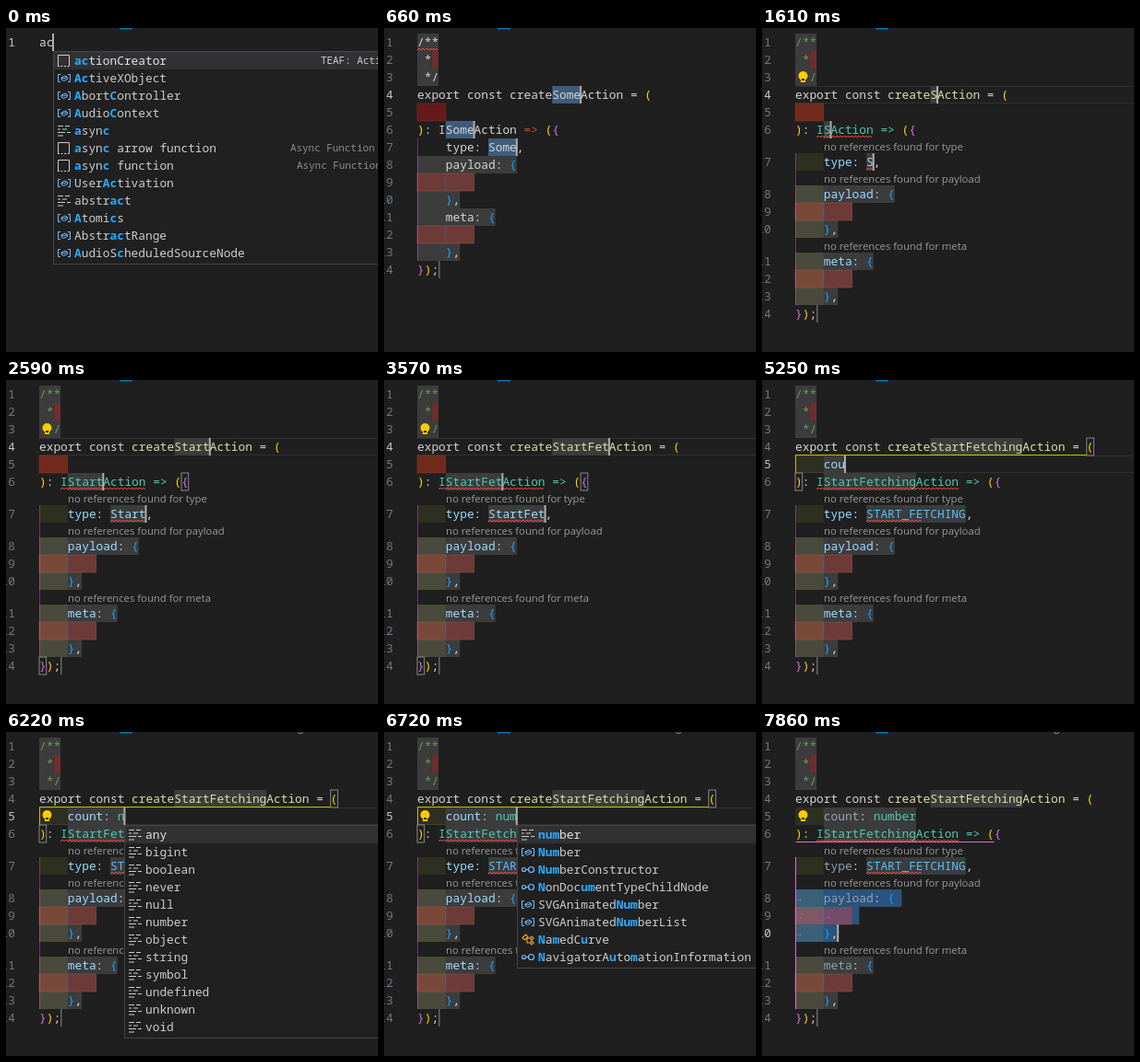
Write an HTML page that moves like this. It is 403 by 352 pixels and loops after 8 s.

```html
<!DOCTYPE html>
<html lang="en">
<head>
<meta charset="utf-8">
<title>Snippet typing</title>
<style>
html, body { margin: 0; width: 100%; height: 100%; overflow: hidden; background: #1f1f1f; }
svg { display: block; }
text { font-family: "Noto Sans Mono", "DejaVu Sans Mono", monospace; font-size: 12.83px; white-space: pre; }
.lens { font-family: "Open Sans", "Noto Sans", sans-serif; font-size: 11.3px; fill: #999; }
.detail { font-size: 10.9px; }
.hit { fill: #2aaaff; font-weight: bold; }
</style>
</head>
<body>
<svg id="stage" width="403" height="352" viewBox="0 0 403 352"></svg>
<script>
const LOOP = 8000, LEFT = 36, CHAR = 7.7, ROW = 19;
const C = {
  text: '#d4d4d4', doc: '#6a9955', func: '#dcdcaa', type: '#4ec9b0', prop: '#9cdcfe', constant: '#4fc1ff',
  gold: '#ffd700', orchid: '#da70d6', blue: '#179fff', error: '#f14c4c', caret: '#aeafad',
  field: '#3c3c3c', icon: '#75beff'
};

// Suggestion lists: icon kind, then label; details are placed from the left edge of the list.
const menus = {
  ac: 's actionCreator,v ActiveXObject,v AbortController,v AudioContext,k async,s async arrow function,s async function,v UserActivation,k abstract,v Atomics,v AbstractRange,v AudioScheduledSourceNode',
  act: 's actionCreator,v ActiveXObject,v AbortController,v AudioContext,s async arrow function,s async function,v UserActivation,k abstract,v AbstractRange',
  acti: 's actionCreator,v ActiveXObject,v UserActivation,s async arrow function,s async function',
  '': 'k any,k bigint,k boolean,k never,k null,k number,k object,k string,k symbol,k undefined,k unknown,k void',
  n: 'k never,k null,k number,v Node,v NodeList,v Number,v Navigator,v NamedNodeMap,v Notification,v NodeFilter,c NamedCurve,i NumberConstructor',
  nu: 'k null,k number,v Number,i NumberConstructor,i NonDocumentTypeChildNode,v SVGAnimatedNumber,v SVGAnimatedNumberList,c NamedCurve',
  num: 'k number,v Number,i NumberConstructor,i NonDocumentTypeChildNode,v SVGAnimatedNumber,v SVGAnimatedNumberList,c NamedCurve,i NavigatorAutomationInformation'
};
const details = {
  actionCreator: [290, 'TEAF: Action'],
  'async arrow function': [257, 'Async Function'],
  'async function': [264, 'Async Function']
};

// Each step changes part of the state from its time on.
const steps = [
  [0, { typed: 'ac', menu: 'ac' }],
  [170, { typed: 'act', menu: 'act' }],
  [240, { typed: 'acti', menu: 'acti' }],
  [660, { typed: null, menu: null, name: 'Some', focus: 'name', selected: true }],
  [730, { color: true }],
  [820, { tint: true }],
  [1100, { lens: true }],
  [1290, { errors: true, bulb: 3 }],
  [1610, { name: 'S', selected: false }],
  [1770, { name: 'St' }],
  [1930, { name: 'Sta' }],
  [2100, { name: 'Star' }],
  [2260, { name: 'Start' }],
  [2430, { match: true }],
  [2660, { name: 'StartF' }],
  [3230, { name: 'StartFe' }],
  [3570, { name: 'StartFet' }],
  [3980, { name: 'StartFetc' }],
  [4100, { name: 'StartFetch' }],
  [4250, { name: 'StartFetchi' }],
  [4400, { name: 'StartFetchin' }],
  [4540, { name: 'StartFetching' }],
  [4780, { kind: 'START_FETCHING', focus: 'arg', arg: '', match: false }],
  [4900, { bulb: 0 }],
  [5100, { arg: 'c' }],
  [5170, { arg: 'co' }],
  [5250, { arg: 'cou' }],
  [5430, { arg: 'coun' }],
  [5520, { arg: 'count' }],
  [5700, { arg: 'count:' }],
  [5860, { arg: 'count: ' }],
  [6050, { bulb: 5, crumb: true }],
  [6140, { menu: '' }],
  [6220, { arg: 'count: n' }],
  [6300, { menu: 'n' }],
  [6470, { arg: 'count: nu', menu: 'nu' }],
  [6640, { arg: 'count: num' }],
  [6720, { menu: 'num' }],
  [6810, { arg: 'count: number', menu: null }],
  [7370, { focus: 'body' }],
  [7530, { faded: true }]
];

const col = n => LEFT + n * CHAR;
const rect = (x, y, w, h, fill, more = '') => `<rect x="${x}" y="${y}" width="${w}" height="${h}" fill="${fill}" ${more}/>`;
const path = (d, stroke, more = '') => `<path d="${d}" fill="none" stroke="${stroke}" ${more}/>`;
const span = (str, fill) => `<tspan fill="${fill}">${str}</tspan>`;
const write = (x, y, parts, more = '') => `<text x="${x}" y="${y}" ${more}>${parts.map(p => span(...p)).join('')}</text>`;
const caret = (x, y) => rect(x - 1, y, 2, ROW, C.caret);

function squiggle(from, to, y) {
  let d = `M${from} ${y}`;
  for (let x = from + 2, up = true; x <= to; x += 2, up = !up) d += `L${x} ${y + (up ? -2 : 0)}`;
  return path(d, C.error);
}

function bulb(y) {
  return `<circle cx="44.5" cy="${y + 8}" r="5" fill="#ffcc00"/>` +
    rect(42, y + 10, 5, 5, '#ffcc00') + rect(43, y + 11, 3, 2, '#1f1f1f');
}

const icons = {
  s: (x, y) => path(`M${x + .5} ${y + 12}V${y + .5}H${x + 12.5}V${y + 12}`, '#ccc') +
    path(`M${x} ${y + 12.5}H${x + 13}`, '#ccc', 'stroke-dasharray="2 1.5"'),
  v: (x, y) => path(`M${x + 3} ${y + 2.5}H${x + .5}V${y + 10.5}H${x + 3}M${x + 11} ${y + 2.5}H${x + 13.5}V${y + 10.5}H${x + 11}`, C.icon) +
    path(`M${x + 4} ${y + 6}L${x + 8} ${y + 4}L${x + 10.5} ${y + 5.5}V${y + 7.5}L${x + 6.5} ${y + 9.5}L${x + 4} ${y + 8}ZL${x + 6.5} ${y + 7}L${x + 10} ${y + 5.5}`, C.icon),
  k: (x, y) => path(`M${x} ${y + 1.5}H${x + 6}M${x + 8} ${y + 1.5}H${x + 13}M${x} ${y + 5}H${x + 3}M${x + 5} ${y + 5}H${x + 10}M${x} ${y + 8.5}H${x + 8}M${x + 10} ${y + 8.5}H${x + 14}M${x} ${y + 12}H${x + 6}`, '#ccc', 'stroke-width="1.2"'),
  i: (x, y) => `<g fill="none" stroke="${C.icon}" stroke-width="1.2"><circle cx="${x + 2.5}" cy="${y + 6.5}" r="2"/><circle cx="${x + 10.5}" cy="${y + 6.5}" r="3"/><path d="M${x + 4.5} ${y + 6.5}h3"/></g>`,
  c: (x, y) => path(`M${x + 1} ${y + 4.5}L${x + 4.5} ${y + 1}L${x + 7} ${y + 3.5}L${x + 3.5} ${y + 7}ZM${x + 6} ${y + 5}H${x + 9}M${x + 6} ${y + 5}V${y + 10}H${x + 9}M${x + 9} ${y + 5}l2 -2l2 2l-2 2zM${x + 9} ${y + 10}l2 -2l2 2l-2 2z`, '#ee9d28', 'stroke-width="1.2"')
};

function findHits(label, query) {
  const low = label.toLowerCase(), whole = low.indexOf(query);
  if (whole >= 0) return [...query].map((_, i) => whole + i);
  const hits = [];
  for (const ch of query) hits.push(low.indexOf(ch, hits.length ? hits[hits.length - 1] + 1 : 0));
  if (!hits.includes(-1)) return hits;
  return [...query].map(ch => low.indexOf(ch));
}

function suggest(query, x, y) {
  const items = menus[query].split(',');
  let out = rect(x + .5, y + .5, 420, items.length * ROW + 3, '#202020', 'stroke="#454545"');
  out += rect(x + 1, y + 1, 420, ROW, '#313133');
  items.forEach((item, i) => {
    const top = y + 1 + i * ROW, label = item.slice(2), hits = findHits(label, query);
    const letters = [...label].map((ch, n) => hits.includes(n) ? `<tspan class="hit">${ch}</tspan>` : ch).join('');
    out += icons[item[0]](Math.round(x) + 5, top + 3);
    out += `<text x="${x + 23}" y="${top + 13.5}" fill="${i ? '#ccc' : '#e4e4e4'}">${letters}</text>`;
    const note = details[label];
    if (note) out += write(x + note[0], top + 13, [[note[1], i ? '#8c8c8c' : '#ccc']], 'class="detail"');
  });
  return out;
}

function chrome(s) {
  let out = rect(0, 0, 403, 352, '#1f1f1f') + rect(123, 0, 14, 1.5, '#0078b8');
  if (s.crumb) out += write(316, -1.5, [['g', '#a0a0a0']], 'class="lens"');
  return out;
}

const lineNumber = (n, y, active) => write(10, y + 14, [[n, active ? '#c6c6c6' : '#6e7681']], 'text-anchor="end"');

function firstWord(s) {
  const end = Math.floor(col(s.typed.length));
  return lineNumber(1, 6, true) + write(LEFT, 20, [[s.typed, C.text]]) + caret(end, 6) + suggest(s.menu, end, 25);
}

function codeView(s) {
  const lensLines = { 7: 'type', 8: 'payload', 11: 'meta' };
  const top = n => 6 + ROW * (n - 1) + (s.lens ? 16 * Object.keys(lensLines).filter(k => k <= n).length : 0);
  const fill = (n, from, to, color, more) => rect(col(from), top(n), (to - from) * CHAR, ROW, color, more);
  const tone = k => s.color ? C[k] : C.text;
  const { name, focus } = s, len = name.length, kind = s.kind || name;
  const inBody = focus === 'body', inArg = focus === 'arg';
  const active = inBody ? 10 : inArg ? 5 : 4;
  const prop = s.faded ? '#8fa2ad' : tone('prop');
  let out = '';

  // Current line frame and tab-stop fields
  if (!s.selected && !inBody)
    out += path(`M${LEFT} ${top(active) + .5}H403M${LEFT} ${top(active) + ROW - .5}H403`, '#303030');
  [[1, 0, 3], [2, 0, 2], [3, 0, 3], [8, 0, 14], [10, 0, 6], [11, 0, 11], [13, 0, 6]].forEach(a => out += fill(...a, C.field));
  const word = s.selected ? '#3f5c7c' : C.field;
  [[4, 19, 19 + len], [6, 4, 4 + len], [7, 10, 10 + kind.length]].forEach(a => out += fill(...a, word));
  if (s.arg) out += fill(5, 4, 4 + s.arg.length, C.field);
  else out += fill(5, 0, 4, '#651a1a', 'stroke="#7c2a2a" stroke-width=".6"');
  out += fill(2, 2, 3, '#6c2f2f');
  [9, 12].forEach(n => out += fill(n, 0, 8, '#6e3a38', 'stroke="#85504e" stroke-width=".6"'));
  if (s.tint) [5, 7, 8, 9, 10, 11, 12, 13].forEach(n => out += fill(n, 0, 4, 'rgba(255,255,64,.07)'));
  out += rect(59, top(14), 1.5, ROW, '#666');

  if (inBody) {
    out += fill(8, 0, 15, '#2b537d', 'rx="2"') + fill(9, 0, 9, '#2b537d') + fill(10, 0, 6, '#2b537d', 'rx="2"');
    out += fill(9, 0, 8, '#744b68');
    [8, 9, 10].forEach(n => out += fill(n, 0, 4, 'rgba(255,255,64,.07)'));
    [[8, 0], [9, 0], [9, 4], [10, 0]].forEach(([n, c]) => out += write(col(c), top(n) + 13.5, [['→', '#71808c']]));
  }

  // Bracket guides
  const x = LEFT + .5;
  out += path(`M${x} ${top(7)}V${top(14)}`, C.orchid, `opacity="${inBody ? 1 : .35}"`);
  [9, 12].forEach(n => out += path(`M${col(4)} ${top(n)}v${ROW}`, C.blue, 'opacity=".3"'));
  if (inBody) out += path(`M${x} ${top(6) + 18.5}H${col(15 + len)}`, C.orchid);
  if (inArg) out += path(`M${col(28 + len)} ${top(4) + 18.5}H${x}V${top(6)}`, C.gold, 'opacity=".8"');
  const box = (n, c) => fill(n, c, c + 1, 'none', 'stroke="#888"');
  if (inArg) out += box(4, 28 + len) + box(6, 0);
  if (s.match) out += box(6, 15 + len) + box(14, 0);

  const doc = tone('doc'), plain = C.text;
  const open = [': ', plain], brace = ['{', C.blue], close = [['    }', C.blue], [',', plain]];
  const [argName, argType] = (s.arg || '').split(':');
  const payload = inBody ? '#93a0aa' : prop;
  const lines = [
    [['/**', doc]],
    [[' *', doc]],
    [[s.bulb === 3 ? '  /' : ' */', doc]],
    [['export const ', plain], [`create${name}Action`, tone('func')], [' = ', plain], ['(', C.gold]],
    [['    ' + argName, s.faded ? '#8fa9b8' : prop], [argType === undefined ? '' : ':', plain], [argType || '', C.type]],
    [[')', C.gold], [': ', plain], [`I${name}Action`, tone('type')], [' =&gt; ', s.color ? C.type : '#d0403a'], ['(', C.gold], ['{', C.orchid]],
    [['    type', prop], open, [kind, s.kind ? C.constant : tone('prop')], [',', plain]],
    [['    payload', payload], open, brace],
    [],
    close,
    [['    meta', prop], open, brace],
    [],
    close,
    [['}', C.orchid], [')', C.gold], [';', plain]]
  ];
  lines.forEach((parts, i) => {
    const n = i + 1, y = top(n);
    out += lineNumber(n, y, n === active) + write(LEFT, y + 14, parts);
    if (s.lens && lensLines[n]) out += `<text class="lens" x="67" y="${y - 3}">no references found for ${lensLines[n]}</text>`;
  });

  if (s.errors) out += squiggle(col(3), col(10 + len), top(6) + 18) + squiggle(col(10), col(10 + (s.kind ? 8 : len)), top(7) + 18);
  else out += squiggle(col(0), col(3), top(1) + 18);
  if (s.bulb) out += bulb(top(s.bulb));

  if (focus === 'name') [[4, 19], [6, 4], [7, 10]].forEach(([n, c]) => out += caret(col(c + len), top(n)));
  if (inArg) out += caret(col(4 + s.arg.length), top(5));
  if (inBody) out += caret(col(6), top(10));
  if (s.menu != null) out += suggest(s.menu, Math.round(col(4 + s.arg.length)), 101);
  return out;
}

const stage = document.getElementById('stage');
let shown = -1;

function render(t) {
  const count = steps.filter(step => step[0] <= t).length;
  if (count === shown) return;
  shown = count;
  const s = Object.assign({}, ...steps.slice(0, count).map(step => step[1]));
  stage.innerHTML = chrome(s) + (s.typed ? firstWord(s) : codeView(s));
}

const start = performance.now();
function tick() {
  render((performance.now() - start) % LOOP);
  requestAnimationFrame(tick);
}
tick();
</script>
</body>
</html>
```
